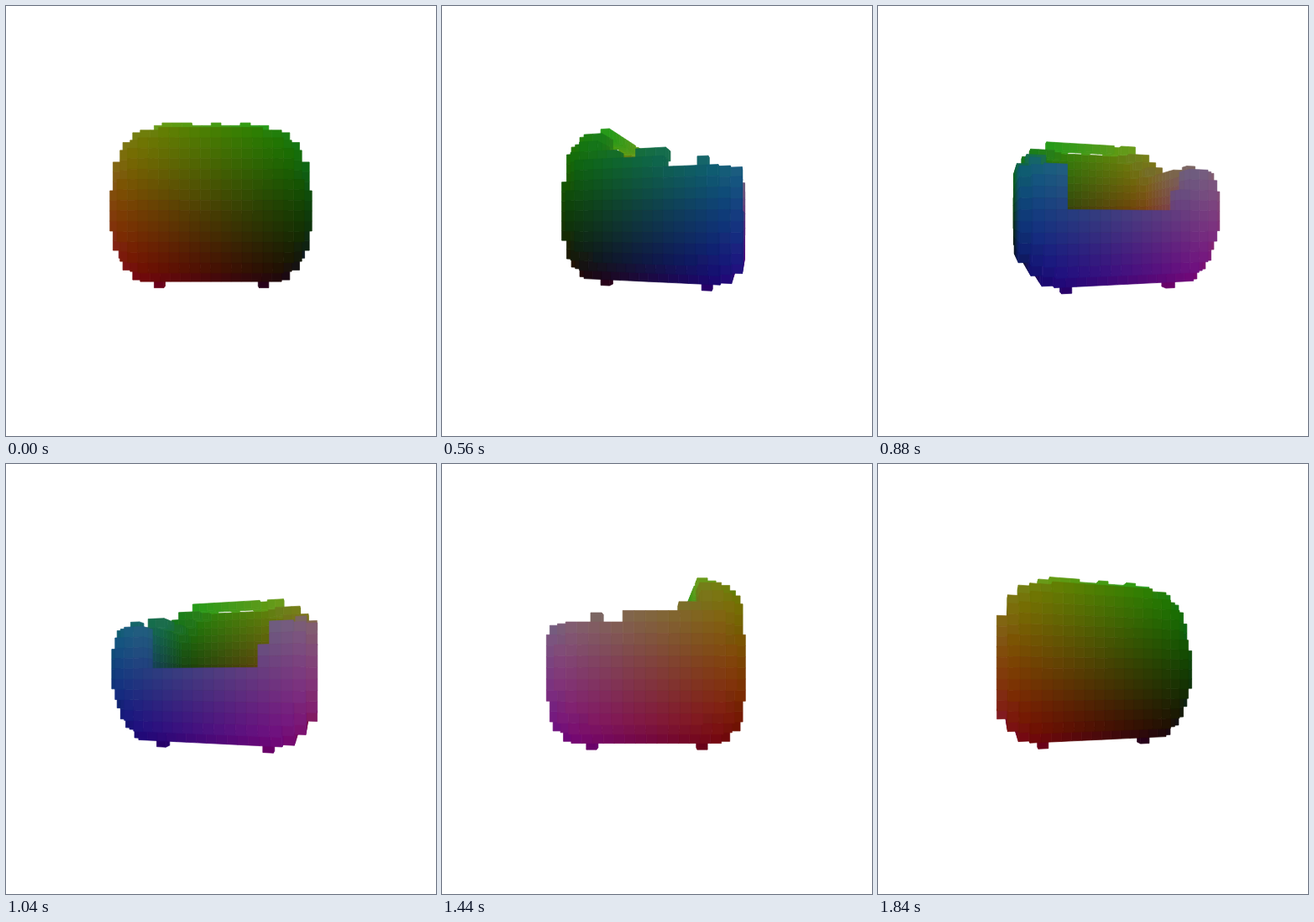
An HTML page with a canvas that plays this animation: 512 px wide and 512 px high, repeating every 1920 ms.

```html
<!DOCTYPE html>
<html lang="en">
<head>
<meta charset="utf-8">
<title>Rotating colour voxels</title>
<style>
  html, body { margin: 0; width: 100%; height: 100%; overflow: hidden; background: #fff; }
  canvas { display: block; width: 512px; height: 512px; }
</style>
</head>
<body>
<canvas id="stage" width="512" height="512"></canvas>
<script>
const ctx = document.getElementById('stage').getContext('2d');
const MID = 256, FOCAL = 416, HALF = 5, CENTRE = 10, WALL = 20;
const STEPS = 24, STEP_MS = 80;

// Axes: r = red, y = up = green, b = blue.
const key = (r, y, b) => `${r},${y},${b}`;
const noise = (r, b) => Math.abs(Math.sin(r * 12.99 + b * 78.23) * 43758.5) % 1;
const channel = v => Math.max(0, Math.min(255, Math.round(v)));

function rimHeight(r, b) {
  if (b < -40) return noise(r, b) > 0.45 ? 100 : 90;
  if (b < -20) return 70;
  if (b > 65 && r > -55 && r < 75) return r > 55 ? 30 : 10;
  if (b < 30) return r < 0 && b > 0 ? 70 : 60;
  return 50;
}

// The red sides bulge like a barrel; the blue sides stay nearly flat.
function inWall(r, y, b) {
  const redSize = 101 - 23 * Math.abs((y - 13) / 72) ** 3.5;
  const blueSize = 92 - 27 * ((y - 16) / 80) ** 10;
  const reach = inset =>
    (Math.abs(r - CENTRE) / (redSize - inset)) ** 6 +
    (Math.abs(b - CENTRE) / (blueSize - inset)) ** 6;
  return reach(0) < 1 && reach(WALL) > 1 && y < rimHeight(r, b);
}

const voxels = new Map();
function addVoxel(r, y, b) {
  const red = channel(66 + 0.6 * r);
  const green = channel(55 + 0.83 * y + (y > 90 ? 20 : 0));
  const blue = channel(58 + 0.73 * b);
  voxels.set(key(r, y, b), { pos: [r, y, b], color: `rgb(${red},${green},${blue})` });
}

for (let y = -55; y < 100; y += 10)
  for (let r = -105; r < 120; r += 10)
    for (let b = -105; b < 120; b += 10)
      if (inWall(r, y, b)) addVoxel(r, y, b);

for (const r of [-45, 65]) for (const b of [-45, 65]) addVoxel(r, -65, b);
addVoxel(95, 55, 55);
addVoxel(-75, 55, 65);

// Keep only faces that are not covered by a neighbour.
for (const voxel of voxels.values()) {
  voxel.faces = [];
  for (let axis = 0; axis < 3; axis++) {
    for (const side of [-1, 1]) {
      const next = [...voxel.pos];
      next[axis] += side * 2 * HALF;
      if (voxels.has(key(...next))) continue;
      const corners = [[-1, -1], [1, -1], [1, 1], [-1, 1]].map(([u, v]) => {
        const p = [...voxel.pos];
        p[axis] += side * HALF;
        p[(axis + 1) % 3] += u * HALF;
        p[(axis + 2) % 3] += v * HALF;
        return p;
      });
      voxel.faces.push({ axis, side, corners });
    }
  }
}
const solids = [...voxels.values()].filter(v => v.faces.length);

function draw(angle) {
  const c = Math.cos(angle), s = Math.sin(angle);
  const eye = [-FOCAL * s, 0, -FOCAL * c];
  const project = ([r, y, b]) => {
    const scale = FOCAL / (FOCAL + r * s + b * c);
    return [MID + (b * s - r * c) * scale, MID - y * scale];
  };
  for (const v of solids)
    v.distance = Math.hypot(...v.pos.map((p, i) => p - eye[i]));
  solids.sort((a, b) => b.distance - a.distance);

  ctx.fillStyle = '#fff';
  ctx.fillRect(0, 0, 512, 512);
  ctx.lineWidth = 0.7;
  ctx.lineJoin = 'round';
  for (const { pos, color, faces } of solids) {
    ctx.fillStyle = ctx.strokeStyle = color;
    for (const { axis, side, corners } of faces) {
      if ((eye[axis] - pos[axis]) * side <= HALF) continue;
      ctx.beginPath();
      for (const p of corners) ctx.lineTo(...project(p));
      ctx.closePath();
      ctx.fill();
      ctx.stroke();
    }
  }
}

let shown = -1;
const start = performance.now();
function tick() {
  const step = Math.floor((performance.now() - start) / STEP_MS) % STEPS;
  if (step !== shown) {
    draw(step / STEPS * 2 * Math.PI);
    shown = step;
  }
  requestAnimationFrame(tick);
}
tick();
</script>
</body>
</html>
```
